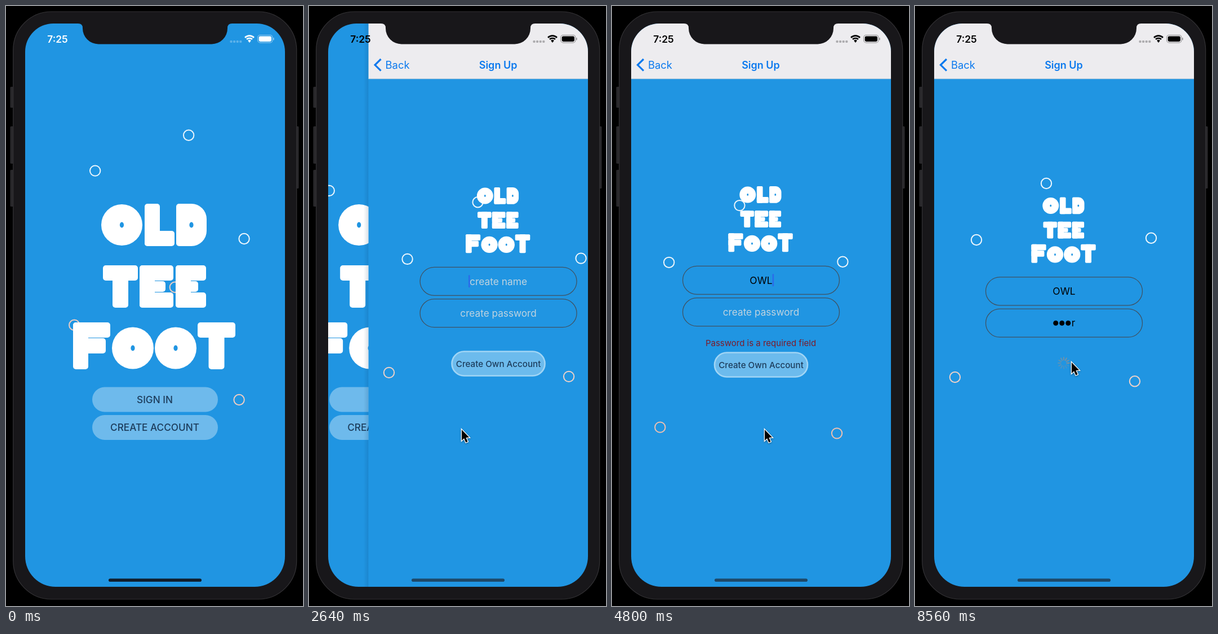
Recreate the animation shown at these times as an HTML page with a canvas. Size 527 px wide and 1062 px high, loop 8600 ms.

```html
<!DOCTYPE html>
<html lang="en">
<head>
<meta charset="utf-8">
<title>Sign up flow</title>
<style>
  html, body { margin: 0; width: 100%; height: 100%; overflow: hidden; background: #000; }
  canvas { display: block; }
</style>
</head>
<body>
<canvas id="stage" width="527" height="1062"></canvas>
<script>
const ctx = document.getElementById('stage').getContext('2d');
const LOOP = 8600;
const BLUE = '#2095e2', FRAME = '#18171a', LINK = '#0b79ee', NAVY = '#1d3d5c';
const SCREEN = { x: 34, y: 31, w: 461, h: 997 };
const CX = 264.5;

const PUSH = 2385, SUBMIT = 8250, FOCUS_PASSWORD = 5500;
const NAME = { text: 'OWL', keys: [3840, 4280, 4680] };
const PASSWORD = { text: 'star', keys: [6300, 6550, 6800, 7040] };

const clamp = v => Math.max(0, Math.min(1, v));
const mix = (a, b, p) => a + (b - a) * p;
const ease = p => { p = clamp(p); return p * p * (3 - 2 * p); };

// Smooth curve through the points (xs, ys)
function curve(xs, ys, x) {
  const last = xs.length - 1;
  let i = 0;
  while (i < last - 1 && x > xs[i + 1]) i++;
  const slope = k => {
    const a = Math.max(0, k - 1), b = Math.min(last, k + 1);
    return (ys[b] - ys[a]) / (xs[b] - xs[a]);
  };
  const h = xs[i + 1] - xs[i], p = clamp((x - xs[i]) / h), q = 1 - p;
  return ys[i] * q * q * (1 + 2 * p) + ys[i + 1] * p * p * (3 - 2 * p)
    + h * p * q * (slope(i) * q - slope(i + 1) * p);
}

function box(x, y, w, h, r, fill, stroke, lw = 1) {
  ctx.beginPath();
  ctx.roundRect(x, y, w, h, r);
  if (fill) { ctx.fillStyle = fill; ctx.fill(); }
  if (stroke) { ctx.strokeStyle = stroke; ctx.lineWidth = lw; ctx.stroke(); }
}

function disc(x, y, r, fill) {
  ctx.beginPath();
  ctx.arc(x, y, r, 0, 7);
  ctx.fillStyle = fill;
  ctx.fill();
}

function label(text, x, y, size, color, weight = 400, align = 'center') {
  ctx.font = `${weight} ${size}px Inter, sans-serif`;
  ctx.textAlign = align;
  ctx.fillStyle = color;
  ctx.fillText(text, x, y + size * 0.364);
}

function hole(x, y) {
  ctx.beginPath();
  ctx.ellipse(x, y, 3.6, 5, 0, 0, 7);
  ctx.fillStyle = BLUE;
  ctx.fill();
}

// Block letters: each is a few rounded bars inside its cell
function glyph(ch, x, y, w, h) {
  const t = 27;
  const bar = (a, b, c, d) => box(x + a, y + b, c, d, 5, '#fff');
  if (ch === 'O') {
    disc(x + w / 2, y + h / 2, w / 2, '#fff');
    hole(x + w / 2, y + h / 2);
  } else if (ch === 'D') {
    box(x, y, w, h, [5, 27, 27, 5], '#fff');
    hole(x + w / 2, y + h / 2);
  } else if (ch === 'T') {
    bar(0, 0, w, t);
    bar(w / 2 - 14, 0, 28, h);
  } else {
    bar(0, 0, t, h);
    if (ch !== 'L') bar(0, 0, w, t);
    if (ch === 'F') bar(0, 28, w - 8, t);
    if (ch === 'E') bar(0, 28, w - 14, 19);
    if (ch !== 'F') bar(0, h - t, w, t);
  }
}

function logo(x, y, scale) {
  ctx.save();
  ctx.translate(x, y);
  ctx.scale(scale, scale);
  const word = (text, cells, top, h) => [...text].forEach((ch, i) => {
    const [left, right] = cells[i];
    const round = ch === 'O';
    glyph(ch, left, round ? top + h - 75 : top, right - left, round ? 75 : h);
  });
  word('OLD', [[-95, -22], [-18, 35], [38, 92]], 0, 75);
  word('TEE', [[-92, -30], [-27, 33], [37, 91]], 109, 75);
  word('FOOT', [[-145, -79], [-76, -2], [0, 74], [76, 143]], 210, 83);
  ctx.restore();
}

// Rings rise past a common mark; AGE is ms relative to that moment
const AGE = [-2300, -1800, -1470, 0, 1370, 2330, 2840, 3175, 3610, 3950];
const RISE = [876, 828, 798, 658, 529, 448, 414, 395, 377, 367];
const STREAMS = [
  { x: [209, 215, 215.5, 192, 204, 228, 233, 236, 239, 240], dy: [-106, -99], lead: 500, end: 3400, home: [90, -78, 16] },
  { x: [82, 90, 94, 71, 75, 103, 109, 112, 115, 116], dy: [0, 0], lead: 0, end: 3700, home: [48, -115, 0] },
  { x: [383, 394, 403, 390, 389, 411, 419, 423, 428, 430], dy: [14, -6], lead: -150, end: 3950, home: [2, 9, 20] }
];

function rings(t, marks, home) {
  ctx.lineWidth = 2;
  for (const mark of marks) for (const s of STREAMS) {
    const u = t - mark;
    const alpha = Math.min(clamp((u + 2300 + s.lead) / 1100), clamp((s.end - u) / 450));
    if (alpha <= 0) continue;
    let x = curve(AGE, s.x, u);
    let y = curve(AGE, RISE, u) + mix(s.dy[0], s.dy[1], clamp((u + 1800) / 5400));
    if (home) {
      x += s.home[0] + s.home[2] * Math.exp(-(((u + 230) / 700) ** 2));
      y += s.home[1];
    }
    const w = u < 0 ? mix(0.15, 0.55, clamp((u + 1800) / 1800)) : mix(0.55, 1, clamp((u - 1400) / 900));
    ctx.strokeStyle = `rgba(255,${mix(165, 255, w)},${mix(130, 255, w)},${alpha * 0.92})`;
    ctx.beginPath();
    ctx.arc(x, y, 9.2, 0, 7);
    ctx.stroke();
  }
}

function homeScreen(t) {
  ctx.fillStyle = BLUE;
  ctx.fillRect(SCREEN.x, SCREEN.y, SCREEN.w, SCREEN.h);
  rings(t, [-2960, 230, 3020], true);
  logo(264, 350, 1);
  [['SIGN IN', 696.5], ['CREATE ACCOUNT', 746]].forEach(([text, y]) => {
    box(153, y - 22, 223, 44, 22, 'rgba(255,255,255,.35)');
    label(text, CX - 0.5, y, 17.2, NAVY, 500);
  });
}

const typed = (field, t) => field.keys.filter(k => t >= k).length;

function inputBox(y) {
  box(125.5, y - 25, 278, 50, 25, BLUE, '#3f5263', 1.3);
}

function caret(x, y, t, since) {
  if ((t - since) % 1060 < 560) box(x, y - 11, 2.6, 22, 1, '#2b6bea');
}

function nameField(t, y) {
  inputBox(y);
  const n = typed(NAME, t), text = NAME.text.slice(0, n) || 'create name';
  label(text, CX, y, 17.4, n ? '#000' : '#bfd3df');
  if (t < FOCUS_PASSWORD) {
    const half = ctx.measureText(text).width / 2;
    caret(n ? CX + half : CX - half - 2, y, t, n ? NAME.keys[n - 1] : PUSH);
  }
}

function passwordField(t, y) {
  inputBox(y);
  const n = typed(PASSWORD, t), size = 17.2;
  const active = t >= FOCUS_PASSWORD && t < SUBMIT;
  if (!n) {
    label('create password', CX, y, size, '#bfd3df');
    const half = ctx.measureText('create password').width / 2;
    if (active) caret(CX - half - 2, y, t, FOCUS_PASSWORD);
    return;
  }
  const last = PASSWORD.text[n - 1];
  ctx.font = `400 ${size}px Inter, sans-serif`;
  const width = (n - 1) * 11 + ctx.measureText(last).width;
  const left = CX - width / 2;
  for (let i = 0; i < n - 1; i++) disc(left + 5 + i * 11, y, 4.5, '#000');
  label(last, left + (n - 1) * 11, y, size, '#000', 400, 'left');
  if (active) caret(left + width, y, t, PASSWORD.keys[n - 1]);
}

function spinner(t, x, y) {
  const step = Math.floor((t - SUBMIT) / 83);
  ctx.lineWidth = 2;
  ctx.lineCap = 'round';
  for (let i = 0; i < 12; i++) {
    const a = i * Math.PI / 6, age = ((step - i) % 12 + 12) % 12;
    ctx.strokeStyle = `rgba(140,145,150,${mix(0.9, 0.25, age / 11)})`;
    ctx.beginPath();
    ctx.moveTo(x + Math.sin(a) * 5.5, y - Math.cos(a) * 5.5);
    ctx.lineTo(x + Math.sin(a) * 10, y - Math.cos(a) * 10);
    ctx.stroke();
  }
  ctx.lineCap = 'butt';
}

function signUpScreen(t) {
  const error = t >= NAME.keys[0] && t < PASSWORD.keys[0];
  const busy = t >= SUBMIT;
  const dy = busy ? 17.5 : error ? -2 : 0;
  ctx.fillStyle = BLUE;
  ctx.fillRect(SCREEN.x, SCREEN.y, SCREEN.w, SCREEN.h);
  rings(t, [310, 2545, 5720, 8550], false);
  logo(264, 321 + dy, 0.397);
  nameField(t, 487.3 + dy);
  passwordField(t, 543.7 + dy);
  if (error) label('Password is a required field', CX - 0.5, 597, 15, '#7c1c2b');
  if (busy) {
    spinner(t, 264, 632);
  } else {
    const y = 633 + (error ? 2 : 0);
    box(182, y - 21.5, 165, 43, 21.5, '#6cbbed', '#a0d5f5', 2.6);
    label('Create Own Account', CX, y, 15.2, NAVY, 500);
  }

  ctx.fillStyle = '#edecef';
  ctx.fillRect(34, 31, 461, 98);
  ctx.fillStyle = '#b9c8d2';
  ctx.fillRect(34, 128.5, 461, 0.8);
  ctx.strokeStyle = LINK;
  ctx.lineWidth = 3.2;
  ctx.beginPath();
  ctx.moveTo(56, 94);
  ctx.lineTo(45.5, 104.3);
  ctx.lineTo(56, 114.6);
  ctx.stroke();
  label('Back', 64, 104.5, 18.4, LINK, 400, 'left');
  label('Sign Up', 264, 104.5, 18, LINK, 600);
}

function statusBar(dark) {
  const ink = dark ? '#000' : '#fff';
  const faint = dark ? 'rgba(0,0,0,.4)' : 'rgba(255,255,255,.5)';
  label('7:25', 91.5, 58.5, 17.4, ink, 600);
  for (let i = 0; i < 4; i++)
    box(397.5 + i * 5.6, 61, 4, 4, 1.2, dark ? 'rgba(0,0,0,.27)' : 'rgba(255,255,255,.27)');
  // wifi
  ctx.strokeStyle = ink;
  ctx.lineWidth = 2.7;
  for (const r of [11.3, 7]) {
    ctx.beginPath();
    ctx.arc(432, 64, r, -Math.PI * 0.75, -Math.PI * 0.25);
    ctx.stroke();
  }
  ctx.fillStyle = ink;
  ctx.beginPath();
  ctx.moveTo(432, 65);
  ctx.arc(432, 64, 4, -Math.PI * 0.75, -Math.PI * 0.25);
  ctx.fill();
  // battery
  box(446.8, 51.5, 26, 13.4, 4, null, faint, 1.1);
  box(448.7, 53.4, 22.2, 9.6, 2.4, ink);
  box(474, 56, 1.6, 4.5, 1, faint);
}

function phoneBody() {
  for (const [x, y, h] of [[7.5, 143, 37], [7.5, 213, 66], [7.5, 290, 65], [512.5, 213, 110]])
    box(x, y, 7, h, 1.5, '#29282b');
  box(12.7, 10, 503, 1040, 68, FRAME, '#343336', 1.2);
}

function notch() {
  ctx.fillStyle = FRAME;
  ctx.beginPath();
  ctx.moveTo(128, 30);
  ctx.lineTo(128, 31);
  ctx.quadraticCurveTo(136, 31, 136, 39);
  ctx.arcTo(136, 67.5, 164, 67.5, 28);
  ctx.lineTo(365, 67.5);
  ctx.arcTo(393, 67.5, 393, 39, 28);
  ctx.lineTo(393, 39);
  ctx.quadraticCurveTo(393, 31, 401, 31);
  ctx.lineTo(401, 30);
  ctx.fill();
}

function pointer(t) {
  if (t < 1050) return;
  const stops = [[1050, 1620, 520, 820, 285, 749], [2000, 2250, 285, 749, 270, 749], [7500, 7950, 270, 749, 277, 630]];
  const [from, to, x0, y0, x1, y1] = stops.filter(s => t >= s[0]).pop();
  const p = ease((t - from) / (to - from));
  ctx.save();
  ctx.translate(mix(x0, x1, p), mix(y0, y1, p));
  ctx.beginPath();
  [[1, 1], [1, 20], [5.2, 16.2], [8.4, 23.4], [11.6, 22], [8.4, 15], [14.2, 14.6]]
    .forEach(([x, y]) => ctx.lineTo(x, y));
  ctx.closePath();
  ctx.shadowColor = 'rgba(0,0,0,.4)';
  ctx.shadowBlur = 3;
  ctx.shadowOffsetY = 1;
  ctx.strokeStyle = '#fff';
  ctx.lineWidth = 2.6;
  ctx.stroke();
  ctx.shadowColor = 'transparent';
  ctx.fillStyle = '#000';
  ctx.fill();
  ctx.restore();
}

function draw(t) {
  ctx.fillStyle = '#000';
  ctx.fillRect(0, 0, 527, 1062);
  phoneBody();

  ctx.save();
  ctx.beginPath();
  ctx.roundRect(SCREEN.x, SCREEN.y, SCREEN.w, SCREEN.h, [50, 50, 54, 54]);
  ctx.clip();
  const k = Math.max(0, t - PUSH) * 0.013;
  const pushed = t > PUSH + 800 ? 1 : 1 - (1 + k) * Math.exp(-k);
  if (pushed < 1) {
    ctx.save();
    ctx.translate(-0.3 * SCREEN.w * pushed, 0);
    homeScreen(t);
    ctx.restore();
  }
  if (pushed > 0) {
    const shift = SCREEN.w * (1 - pushed), edge = SCREEN.x + shift;
    if (pushed < 1) {
      const shade = ctx.createLinearGradient(edge - 9, 0, edge, 0);
      shade.addColorStop(0, 'rgba(0,40,80,0)');
      shade.addColorStop(1, 'rgba(0,40,80,.14)');
      ctx.fillStyle = shade;
      ctx.fillRect(edge - 9, 31, 9, 997);
    }
    ctx.save();
    ctx.translate(shift, 0);
    signUpScreen(t);
    ctx.restore();
  }
  const dark = t > PUSH;
  statusBar(dark);
  box(182, 1013.4, 165, 5.6, 2.8, dark ? '#1d4868' : '#101d2b');
  ctx.restore();

  notch();
  pointer(t);
}

const start = performance.now();
function tick() {
  draw((performance.now() - start) % LOOP);
  requestAnimationFrame(tick);
}
tick();
</script>
</body>
</html>
```
